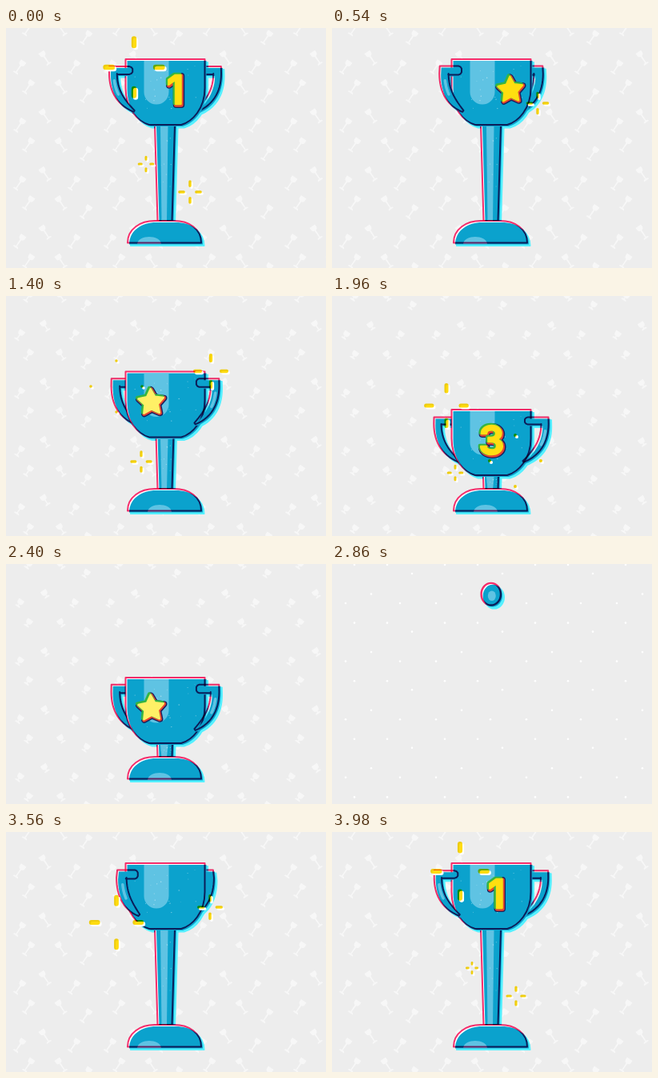
Recreate the animation shown at these times as an HTML page with a canvas. Size 400x300 px, loop 4 s.

```html
<!DOCTYPE html>
<html lang="en">
<head>
<meta charset="utf-8">
<title>Spinning trophy</title>
<style>
html, body { margin: 0; width: 100%; height: 100%; overflow: hidden; background: #ededed; }
canvas { display: block; width: 400px; height: 300px; }
</style>
</head>
<body>
<canvas id="stage"></canvas>
<script>
const LOOP = 4000;
const CX = 200;
const BLUE = '#0ba2cd', LIGHT = '#5fc3e3', PINK = '#ff2d6e', CYAN = '#55f0ff', YELLOW = '#ffdc10';
const STEM = { tall: 120, medium: 64.5, short: 17 };
const CUP_HEIGHT = 82;
const LAUNCH = 2670, LAND = 3170;

const canvas = document.getElementById('stage');
const ctx = canvas.getContext('2d');
const ratio = window.devicePixelRatio || 1;
canvas.width = 400 * ratio;
canvas.height = 300 * ratio;

const clamp = v => Math.max(0, Math.min(1, v));
const span = (t, a, b) => clamp((t - a) / (b - a));
const mix = (a, b, k) => a + (b - a) * k;
const backOut = k => 1 + 2.4 * (k - 1) ** 3 + 1.4 * (k - 1) ** 2;

let seed = 7;
const random = () => (seed = (seed * 16807) % 2147483647) / 2147483647;
const cupSpecks = Array.from({ length: 22 }, () => [156 + random() * 88, 4 + random() * 62, 0.3 + random() * 0.4]);
const stemSpecks = Array.from({ length: 10 }, () => [193 + random() * 14, random(), 0.3 + random() * 0.3]);

// Each sparkle: start time and centre
const sparkles = [
  [60, 138, 113], [415, 257, 94], [560, 169, 207], [960, 138, 113], [1195, 256, 94],
  [1280, 169, 207], [1525, 229, 206], [1690, 143, 137], [1870, 154, 221],
  [3220, 138, 113], [3420, 255, 94], [3610, 160, 49], [3870, 230, 205], [3910, 175, 170]
];

const starPath = (() => {
  const p = new Path2D();
  for (let i = 0; i < 10; i++) {
    const a = -Math.PI / 2 + i * Math.PI / 5 - 0.05;
    const r = i % 2 ? 8.5 : 16.5;
    p.lineTo(r * Math.cos(a), r * Math.sin(a));
  }
  p.closePath();
  return p;
})();

function ink(dx, dy, mode, draw) {
  ctx.save();
  ctx.translate(dx, dy);
  ctx.globalCompositeOperation = mode;
  ctx.lineJoin = ctx.lineCap = 'round';
  draw();
  ctx.restore();
}

function fill(path, color, d = 0, mode = 'source-over') {
  ink(d, d, mode, () => { ctx.fillStyle = color; ctx.fill(path); });
}

function stroke(path, color, width, d = 0, mode = 'source-over') {
  ink(d, d, mode, () => { ctx.strokeStyle = color; ctx.lineWidth = width; ctx.stroke(path); });
}

// Handle centre line: distance from the axis, height below the rim, relative thickness
const handleLine = [[42, 14, 0.4], [43.5, 14, 0.8], [46, 14, 1], [56, 14, 1]];
for (let i = 0; i <= 16; i++) {
  const u = i / 16, v = 1 - u;
  const bezier = (a, b, c, d) => a * v ** 3 + 3 * b * v * v * u + 3 * c * v * u * u + d * u ** 3;
  handleLine.push([bezier(67, 68, 60, 40), bezier(14, 36, 52, 65), 1 - 0.8 * u ** 4]);
}

const unit = (a, b) => {
  const dx = b[0] - a[0], dy = b[1] - a[1], len = Math.hypot(dx, dy) || 1;
  return [dx / len, dy / len];
};

function handlePath(top, turn) {
  const pts = handleLine.map(([r, y]) => [CX + r * turn, top + y]);
  const thick = 4.6 + 5 * (1 - turn * turn);
  const left = [], right = [];
  pts.forEach((pt, i) => {
    const before = unit(pts[Math.max(0, i - 1)], pts[Math.max(1, i)]);
    const after = unit(pts[Math.min(pts.length - 2, i)], pts[Math.min(pts.length - 1, i + 1)]);
    const [tx, ty] = unit([0, 0], [before[0] + after[0], before[1] + after[1]]);
    const miter = 1 / Math.max(0.65, tx * before[0] + ty * before[1]);
    const half = (i < 5 ? Math.min(thick, 5.4) : thick) * handleLine[i][2] * miter;
    left.push([pt[0] - ty * half, pt[1] + tx * half]);
    right.unshift([pt[0] + ty * half, pt[1] - tx * half]);
  });
  const p = new Path2D();
  left.concat(right).forEach(q => p.lineTo(...q));
  p.closePath();
  return p;
}

function bodyPaths(stem) {
  const neck = 242 - stem, top = neck - CUP_HEIGHT;
  const flare = 3.5 * stem / STEM.tall;
  const cup = new Path2D(`M150.5 ${top}H249.5V${top + 36}C249.5 ${top + 62} 234 ${top + 78} 220 ${neck}
    H180C166 ${top + 78} 150.5 ${top + 62} 150.5 ${top + 36}Z`);
  const stemPath = new Path2D(`M${190.5 - flare} ${neck}H${208.5 + flare}L208.5 242H190.5Z`);
  const base = new Path2D('M153 269.5C153 252 169 242 187 242H211C230 242 245 252 245 269.5Z');
  return { top, neck, cup, stem: stemPath, base };
}

function stemHeight(t) {
  if (t > 2900) return STEM.tall;
  const first = backOut(span(t, 580, 860));
  const second = backOut(span(t, 1580, 1860));
  return STEM.tall + (STEM.medium - STEM.tall) * first + (STEM.short - STEM.medium) * second;
}

function trophyScale(t) {
  if (t < LAUNCH) return 1 - span(t, 2470, LAUNCH) ** 2;
  return t < LAND ? 0 : backOut(span(t, LAND, 3480));
}

function drawSpecks(list, place) {
  ctx.fillStyle = 'rgba(255,255,255,.5)';
  list.forEach(s => {
    const [x, y] = place(s);
    ctx.beginPath();
    ctx.arc(x, y, s[2], 0, 7);
    ctx.fill();
  });
}

function drawPart(path, solid, details) {
  if (solid) fill(path, '#fff', -1);
  fill(path, BLUE, 1);
  if (details) details();
  stroke(path, PINK, 2, -1, 'multiply');
}

// Misregistered colour plates shared by the star and the digits
function drawPlates(core, plate) {
  plate('#17205f', 8, 1);
  plate('#e8452f', 5.5, 0.8);
  plate('#35b544', 4.5, -1);
  plate(core, 2.5, 0.4);
}

function drawStar(core) {
  drawPlates(core, (color, width, d) => {
    stroke(starPath, color, width, d);
    fill(starPath, color, d);
  });
}

function drawDigit(digit, core) {
  ctx.font = '600 50px Inter, "Open Sans", sans-serif';
  ctx.textAlign = 'center';
  drawPlates(core, (color, width, d) => ink(d, d, 'source-over', () => {
    ctx.strokeStyle = ctx.fillStyle = color;
    ctx.lineWidth = width;
    ctx.strokeText(digit, 0, 18);
    ctx.fillText(digit, 0, 18);
  }));
}

function drawFace(angle, top, draw) {
  const width = Math.cos(angle);
  if (width < 0.08) return;
  const pale = clamp(-2 * Math.sin(angle));
  ctx.save();
  ctx.translate(CX - 0.5 + 49 * Math.sin(angle), top + 37);
  ctx.scale(Math.min(1, width * 1.1), 1);
  draw(`rgb(255,${mix(222, 246, pale)},${mix(16, 130, pale)})`);
  ctx.restore();
}

function drawTrophy(t, scale) {
  const angle = (13.5 + t * 0.36) * Math.PI / 180;
  const stem = stemHeight(t);
  const body = bodyPaths(stem);
  const { top, neck } = body;
  const turn = Math.cos(angle);
  const leftInFront = Math.sin(angle) > 0;
  const left = handlePath(top, -turn), right = handlePath(top, turn);
  const [front, back] = leftInFront ? [left, right] : [right, left];
  const gleam = mix(192, 179, span(stem, STEM.medium, STEM.tall));

  ctx.save();
  ctx.translate(CX, 266);
  ctx.scale(scale, scale);
  ctx.translate(-CX, -266);
  [back, body.stem, body.base, body.cup, front].forEach(p => {
    fill(p, CYAN, 2.7);
    stroke(p, CYAN, 1.6, 2.7);
  });
  drawPart(back, false);
  drawPart(body.stem, true, () => {
    fill(new Path2D(`M193 ${neck + 1}H202.5L201 242H194.5Z`), LIGHT);
    drawSpecks(stemSpecks, s => [s[0], mix(neck + 3, 240, s[1])]);
  });
  drawPart(body.base, true, () =>
    fill(new Path2D(`M${gleam - 15} 270C${gleam - 14} 258 ${gleam + 14} 258 ${gleam + 15} 270Z`), LIGHT));
  drawPart(body.cup, true, () => {
    fill(new Path2D(`M172.5 ${top + 1}H203.5V${top + 40}A15.5 15.5 0 0 1 172.5 ${top + 40}Z`), LIGHT);
    drawSpecks(cupSpecks, s => [s[0], top + s[1]]);
  });
  if (t < 3000) drawFace(angle + Math.PI, top, drawStar);
  const digit = t < 500 || t > 3000 ? '1' : t < 1500 ? '2' : '3';
  drawFace(angle, top, core => drawDigit(digit, core));
  drawPart(front, false, () => {
    const side = leftInFront ? -1 : 1;
    const shine = new Path2D();
    handleLine.slice(7, 13).forEach(([r, y]) => shine.lineTo(CX + side * r * turn, top + y));
    stroke(shine, LIGHT, 3.5);
  });
  ctx.restore();
}

function drawBall(t) {
  const k = (t - (LAUNCH + LAND) / 2) / ((LAND - LAUNCH) / 2);
  const y = 26 + 228 * Math.min(1, k * k);
  const speed = Math.abs(k);
  const ball = new Path2D();
  ball.ellipse(199.8, y, 12.4 - speed, 13.4 + 2 * speed, 0, 0, 7);
  const shine = new Path2D();
  shine.ellipse(199.8, y + 1, 5, 6.3, 0, 0, 7);
  fill(ball, CYAN, 3);
  stroke(ball, CYAN, 2, 3);
  fill(ball, '#fff', -1);
  fill(ball, BLUE, 1);
  fill(shine, LIGHT);
  stroke(ball, PINK, 2.4, -1, 'multiply');
}

// Pattern cell: x, y, tilt
const cell = [[28, 1, 1], [69, 1, -1], [100, 12, 1], [49, 37.5, -1], [17, 49, 1], [85, 49, 1]];

function drawPattern(t, scale) {
  const { top, cup, stem, base } = bodyPaths(stemHeight(t));
  const icon = new Path2D();
  [cup, stem, base].forEach(p => icon.addPath(p));
  const small = scale < 0.14;
  ctx.fillStyle = small ? '#fff' : '#f7f7f7';
  for (let x0 = -113; x0 < 420; x0 += 113) {
    for (let y0 = -72.6; y0 < 310; y0 += 72.6) {
      cell.forEach(([x, y, tilt]) => {
        ctx.save();
        ctx.translate(x0 + x, y0 + y);
        if (small) {
          ctx.beginPath();
          ctx.arc(0, 0, 1.3, 0, 7);
          ctx.fill();
        } else {
          ctx.rotate(tilt * 0.6);
          ctx.scale(0.08 * scale, 0.08 * scale);
          ctx.translate(-CX, -(top + 270) / 2);
          ctx.fill(icon);
        }
        ctx.restore();
      });
    }
  }
}

function drawSparkle(t, [start, x, y]) {
  const p = ((t - start + LOOP) % LOOP) / 450;
  if (p >= 1) return;
  const fade = clamp((1 - p) / 0.12);
  const radius = Math.min(36 * p, 32);
  const width = (2 + 5 * p) * mix(0.4, 1, fade);
  const half = Math.max(0.1, (Math.min(7 + 9 * p, 30 * p) * fade - width) / 2);
  const rays = new Path2D();
  [[1, 0], [-1, 0], [0, 1], [0, -1]].forEach(([dx, dy]) => {
    rays.moveTo(x + dx * (radius - half), y + dy * (radius - half));
    rays.lineTo(x + dx * (radius + half), y + dy * (radius + half));
  });
  stroke(rays, '#fff', width, 2);
  stroke(rays, YELLOW, width, 0, 'multiply');
}

function render(t) {
  ctx.setTransform(ratio, 0, 0, ratio, 0, 0);
  ctx.fillStyle = '#ededed';
  ctx.fillRect(0, 0, 400, 300);
  const scale = trophyScale(t);
  drawPattern(t, scale);
  if (scale < 0.14) drawBall(t);
  else drawTrophy(t, scale);
  sparkles.forEach(s => drawSparkle(t, s));
}

const begin = performance.now();
function tick() {
  render((performance.now() - begin) % LOOP);
  requestAnimationFrame(tick);
}
tick();
</script>
</body>
</html>
```
